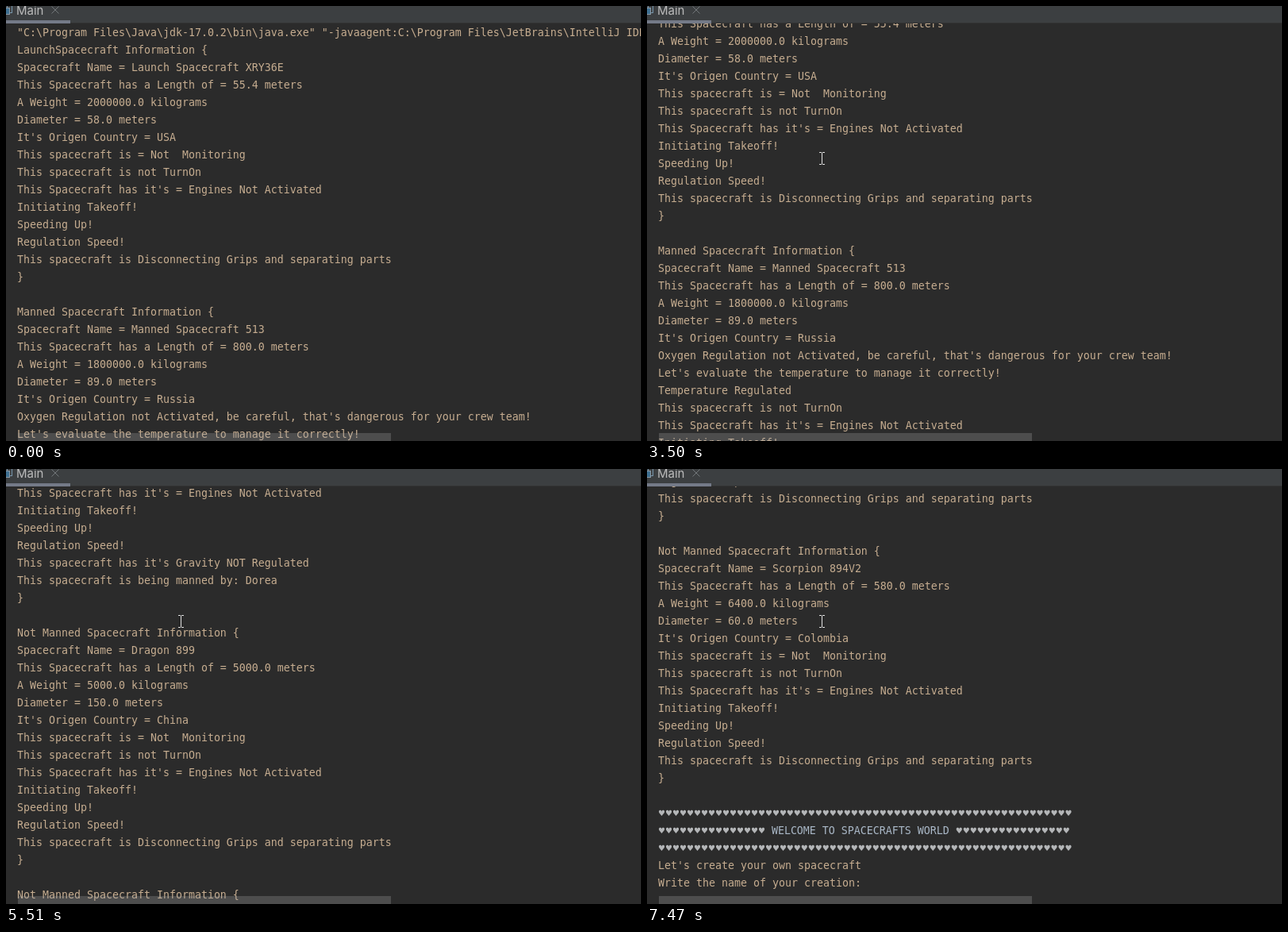
Animation of 800 by 548 pixels, one loop 8 s. Source, as an HTML page with a canvas:

```html
<!DOCTYPE html>
<html lang="en">
<head>
<meta charset="utf-8">
<title>Console scroll</title>
<style>
html, body { margin: 0; width: 100%; height: 100%; overflow: hidden; background: #2b2b2b; }
canvas { display: block; }
</style>
</head>
<body>
<canvas id="stage" width="800" height="548"></canvas>
<script>
const ctx = document.getElementById('stage').getContext('2d');
const LOOP = 8000, LINE = 22, LEFT = 14, FIRST_BASELINE = 38;
const MONO = '13.29px "DejaVu Sans Mono", monospace';
const HEARTS = '10.045px "DejaVu Sans", sans-serif';
const TAN = '#c6ad90', GREY = '#b4b6b8';

const specs = (name, length, weight, diameter, country) => [
  `Spacecraft Name = ${name}`,
  `This Spacecraft has a Length of = ${length} meters`,
  `A Weight = ${weight} kilograms`,
  `Diameter = ${diameter} meters`,
  `It's Origen Country = ${country}`,
];
const takeoff = [
  'This spacecraft is not TurnOn',
  "This Spacecraft has it's = Engines Not Activated",
  'Initiating Takeoff!', 'Speeding Up!', 'Regulation Speed!',
];
const unmanned = (title, ...data) => [
  `${title} Information {`, ...specs(...data),
  'This spacecraft is = Not  Monitoring', ...takeoff,
  'This spacecraft is Disconnecting Grips and separating parts', '}', '',
];
const lines = [
  String.raw`"C:\Program Files\Java\jdk-17.0.2\bin\java.exe" "-javaagent:C:\Program Files\JetBrains\IntelliJ IDEA`,
  ...unmanned('LaunchSpacecraft', 'Launch Spacecraft XRY36E', '55.4', '2000000.0', '58.0', 'USA'),
  'Manned Spacecraft Information {',
  ...specs('Manned Spacecraft 513', '800.0', '1800000.0', '89.0', 'Russia'),
  "Oxygen Regulation not Activated, be careful, that's dangerous for your crew team!",
  "Let's evaluate the temperature to manage it correctly!",
  'Temperature Regulated', ...takeoff,
  "This spacecraft has it's Gravity NOT Regulated",
  'This spacecraft is being manned by: Dorea', '}', '',
  ...unmanned('Not Manned Spacecraft', 'Dragon 899', '5000.0', '5000.0', '150.0', 'China'),
  ...unmanned('Not Manned Spacecraft', 'Scorpion 894V2', '580.0', '6400.0', '60.0', 'Colombia'),
  '♥'.repeat(58),
  '♥'.repeat(15) + ' WELCOME TO SPACECRAFTS WORLD ' + '♥'.repeat(16),
  '♥'.repeat(58),
  "Let's create your own spacecraft",
  'Write the name of your creation:',
];

// Each move: first step, last step (ms), number of steps, from, to
const scrolls = [
  [3430, 3710, 5, [0], [198]],
  [4300, 4650, 6, [198], [528]],
  [5510, 5790, 5, [528], [858]],
  [7270, 7470, 4, [858], [1008]],
];
const pointerMoves = [
  [1140, 1470, 5, [850, 570], [318, 299]],
  [1730, 2080, 6, [318, 299], [67, 63]],
  [2220, 2670, 8, [67, 63], [107, 51]],
  [2735, 2940, 4, [107, 51], [177, 111]],
  [3030, 3160, 3, [177, 111], [220, 192]],
];
const wheelEase = u => 1 - (1 - u ** 1.54) ** 1.753;
const handEase = u => u * u * (3 - 2 * u);

function positionAt(t, moves, ease) {
  const move = moves.findLast(m => t >= m[0]);
  if (!move) return moves[0][3];
  const [start, end, count, from, to] = move;
  const step = Math.floor((t - start + 0.5) * (count - 1) / (end - start)) + 1;
  const p = ease(Math.min(1, step / count));
  return from.map((a, i) => Math.round(a + (to[i] - a) * p));
}

function rect(color, x, y, w, h) {
  ctx.fillStyle = color;
  ctx.fillRect(x, y, w, h);
}

function text(str, x, y, font, color) {
  ctx.font = font;
  ctx.fillStyle = color;
  ctx.fillText(str, x, y);
  return x + ctx.measureText(str).width;
}

function drawLine(str, y) {
  if (!str.includes('♥')) return text(str, LEFT, y, MONO, TAN);
  let x = LEFT;
  for (const run of str.match(/♥+|[^♥]+/g)) {
    x = run[0] === '♥' ? text(run, x, y - 1, HEARTS, GREY) : text(run, x, y, MONO, '#a9b7c6');
  }
}

function drawHeader() {
  rect('#3c3f41', 0, 0, 800, 21);
  rect('#323232', 0, 21, 800, 1);
  rect('#747a88', 0, 18, 81, 4);
  ctx.lineWidth = 1;
  ctx.strokeStyle = '#7896ac';
  ctx.strokeRect(1.5, -1.5, 6, 10);
  rect('#3e6f91', -1, 2, 6, 9);
  ctx.strokeStyle = '#8b9aa5';
  ctx.strokeRect(-1.5, 2.5, 6, 8);
  text('Main', 13, 11, '15px Inter, sans-serif', '#bbbbbb');
  ctx.strokeStyle = '#72777a';
  ctx.beginPath();
  ctx.moveTo(57.5, 0.5); ctx.lineTo(66.5, 9.5);
  ctx.moveTo(66.5, 0.5); ctx.lineTo(57.5, 9.5);
  ctx.stroke();
}

function drawPointer(x, y) {
  rect('#e0e0e0', x, y - 7, 1, 14);
  for (const dy of [-8, 7]) {
    rect('#e0e0e0', x - 3, y + dy, 3, 1);
    rect('#e0e0e0', x + 1, y + dy, 3, 1);
  }
}

function draw(now) {
  const t = now % LOOP;
  const [scroll] = positionAt(t, scrolls, wheelEase);
  rect('#2b2b2b', 0, 0, 800, 548);
  lines.forEach((str, i) => {
    const y = FIRST_BASELINE + i * LINE - scroll;
    if (y > 0 && y < 570) drawLine(str, y);
  });
  rect('rgba(166, 166, 166, 0.28)', 15, 538, 470, 10);
  drawHeader();
  if (t >= pointerMoves[0][0]) drawPointer(...positionAt(t, pointerMoves, handEase));
  requestAnimationFrame(draw);
}
requestAnimationFrame(draw);
</script>
</body>
</html>
```
